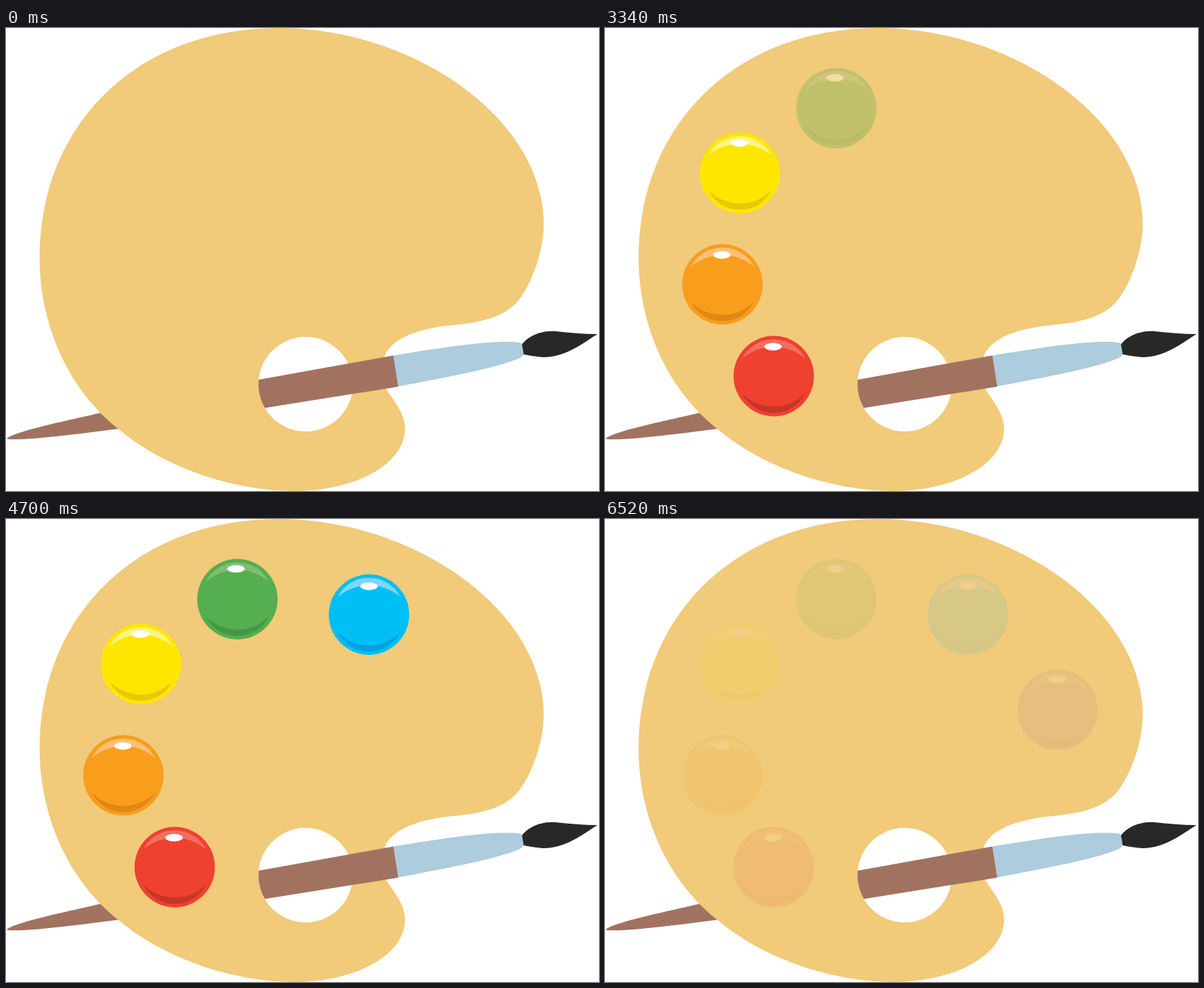
Animation of 847x661 px, one loop 6.58 s. Source, as an HTML page:

```html
<!DOCTYPE html>
<html lang="en">
<head>
<meta charset="utf-8">
<title>Paint palette</title>
<style>
  html, body { margin: 0; width: 100%; height: 100%; overflow: hidden; background: #fff; }
  svg { display: block; }
</style>
</head>
<body>
<svg width="847" height="661" viewBox="0 0 847 661">
  <defs>
    <clipPath id="hole">
      <path d="M361 441H600V576H428A67.5 67.5 0 0 1 428 441Z"/>
    </clipPath>
  </defs>
  <path fill="#a27261" d="M1 586C15 575 90 560 137 549L170 571C100 580 30 589 3 587Z"/>
  <path fill="#f1ca7a" d="M390 0C580 0 768 128 768 280C768 313 755 356 735 385C715 413 680 420 640 424
    C598 428 553 439 541 468L543 515C553 532 570 549 570 572C570 621 502 661 412 661
    C320 661 222 625 160 572C90 517 48 425 48 328C48 140 185 0 390 0Z"/>
  <circle cx="428" cy="508.5" r="67.5" fill="#fff"/>
  <path fill="#a27261" clip-path="url(#hole)" d="M350 504L553.5 467.5L560.5 512L350 545.7Z"/>
  <path fill="#adccdd" d="M553.5 467.5C640 453 703 445 733 449Q738 450 738 453L740 465Q739 468 734 471C705 484 640 497 560.5 511.5Z"/>
  <path fill="#282828" d="M737 451.5C750 436 769 432 785 433C805 435 825 437 845 437C825 449 800 470 768 470Q753 469 739.5 466Z"/>
  <g id="paints"></g>
</svg>
<script>
  // x, y, base, highlight, shade, glint offset x and y
  const paints = [
    [241, 497, '#ef4130', '#f46e5e', '#c63628', -1, -42],
    [167.7, 366, '#f99d1c', '#fbbf77', '#e28616', -.7, -42],
    [192.7, 207, '#ffe600', '#fff480', '#e8c808', -.7, -42.7],
    [330.5, 114.5, '#55ae4f', '#7fbf74', '#469743', -2, -43.3],
    [518.5, 136.5, '#00bff5', '#80d5fa', '#00a3df', 0, -40.5],
    [646.3, 272.5, '#995ca5', '#b183b9', '#774582', 0, -43.5]
  ];
  const LOOP = 6580, HOLD = 400, TICK = 60, PERIOD = 940, FADE_OUT = 6040;

  const group = document.getElementById('paints');
  group.innerHTML = paints.map(([x, y, base, light, shade, gx, gy]) =>
    `<g transform="translate(${x} ${y})">
      <circle r="57.4" fill="${base}"/>
      <path fill="${light}" d="M-45 -25A50.5 50.5 0 0 1 45 -25A69 69 0 0 0 -45 -25Z"/>
      <path fill="${shade}" d="M-45 25A50.5 50.5 0 0 0 45 25A64 64 0 0 1 -45 25Z"/>
      <ellipse cx="${gx}" cy="${gy}" rx="12.4" ry="5.4" fill="#fff"/>
    </g>`).join('');

  // Opacity moves in tenths, one per tick
  const steps = (t, start) =>
    Math.max(0, Math.min(10, Math.floor((t - start) / TICK) + 1)) / 10;

  const origin = performance.now();
  function draw(now) {
    const t = Math.max(0, now - origin) % LOOP;
    const out = 1 - steps(t, FADE_OUT);
    [...group.children].forEach((ball, i) => {
      ball.setAttribute('opacity', Math.min(steps(t, HOLD + i * PERIOD), out));
    });
    requestAnimationFrame(draw);
  }
  draw(origin);
</script>
</body>
</html>
```
